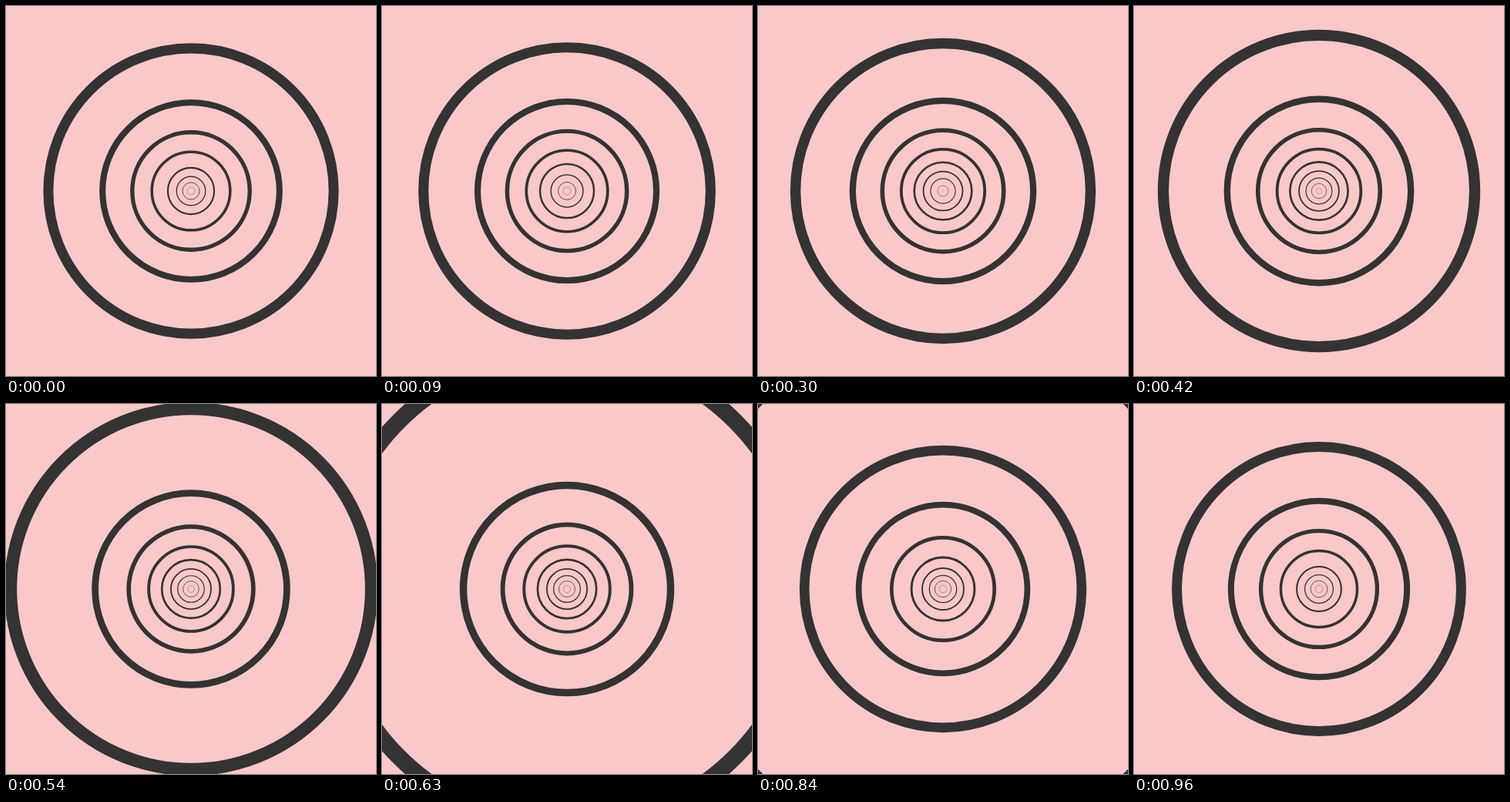
An HTML page with a canvas for the animation above (990 ms loop, 480 px wide and 480 px high).

```html
<!DOCTYPE html>
<html lang="en">
<head>
<meta charset="utf-8">
<title>Concentric rings</title>
<style>
  html, body { margin: 0; width: 100%; height: 100%; overflow: hidden; background: #fac8c8; }
  canvas { display: block; width: 480px; height: 480px; }
</style>
</head>
<body>
<canvas id="stage" width="480" height="480"></canvas>
<script>
  const LOOP = 990, TICK = 30, SIZE = 480;
  const LINE = 0.068; // stroke width relative to the outer radius

  // Resting radii; every loop each ring moves out to the next one.
  const slots = [0, 5, 11, 18, 27, 39, 56.2, 81.5, 120.8, 193.2, 366];
  // Start of the move out of each slot: the outermost ring leads.
  const starts = [850, 815, 715, 600, 522, 423, 344, 264, 188, 88];

  const ctx = document.getElementById('stage').getContext('2d');

  // Same curve as cubic-bezier(.85, 0, .15, 1)
  function ease(x) {
    if (x <= 0) return 0;
    if (x >= 1) return 1;
    let lo = 0, hi = 1;
    for (let i = 0; i < 24; i++) {
      const u = (lo + hi) / 2, v = 1 - u;
      if (2.55 * u * v * v + 0.45 * u * u * v + u * u * u < x) lo = u;
      else hi = u;
    }
    return lo * lo * (3 - 2 * lo);
  }

  const progress = (k, t) => ease((t - starts[k]) / LOOP);

  // Slot radius, less the rest of the previous move, plus the current move.
  function radius(k, t) {
    let r = slots[k];
    if (k > 0) r -= (slots[k] - slots[k - 1]) * (1 - progress(k - 1, t + LOOP));
    if (k < starts.length) r += (slots[k + 1] - slots[k]) * progress(k, t);
    return r;
  }

  function draw(t) {
    ctx.fillStyle = '#fac8c8';
    ctx.fillRect(0, 0, SIZE, SIZE);
    ctx.strokeStyle = '#333';
    for (let k = 0; k < slots.length; k++) {
      const r = radius(k, t);
      if (r < 0.5) continue;
      ctx.lineWidth = r * LINE;
      ctx.beginPath();
      ctx.arc(SIZE / 2, SIZE / 2, r * (1 - LINE / 2), 0, Math.PI * 2);
      ctx.stroke();
    }
  }

  const begin = performance.now();
  function frame() {
    const t = (performance.now() - begin) % LOOP;
    draw(Math.floor(t / TICK) * TICK);
    requestAnimationFrame(frame);
  }
  frame();
</script>
</body>
</html>
```
